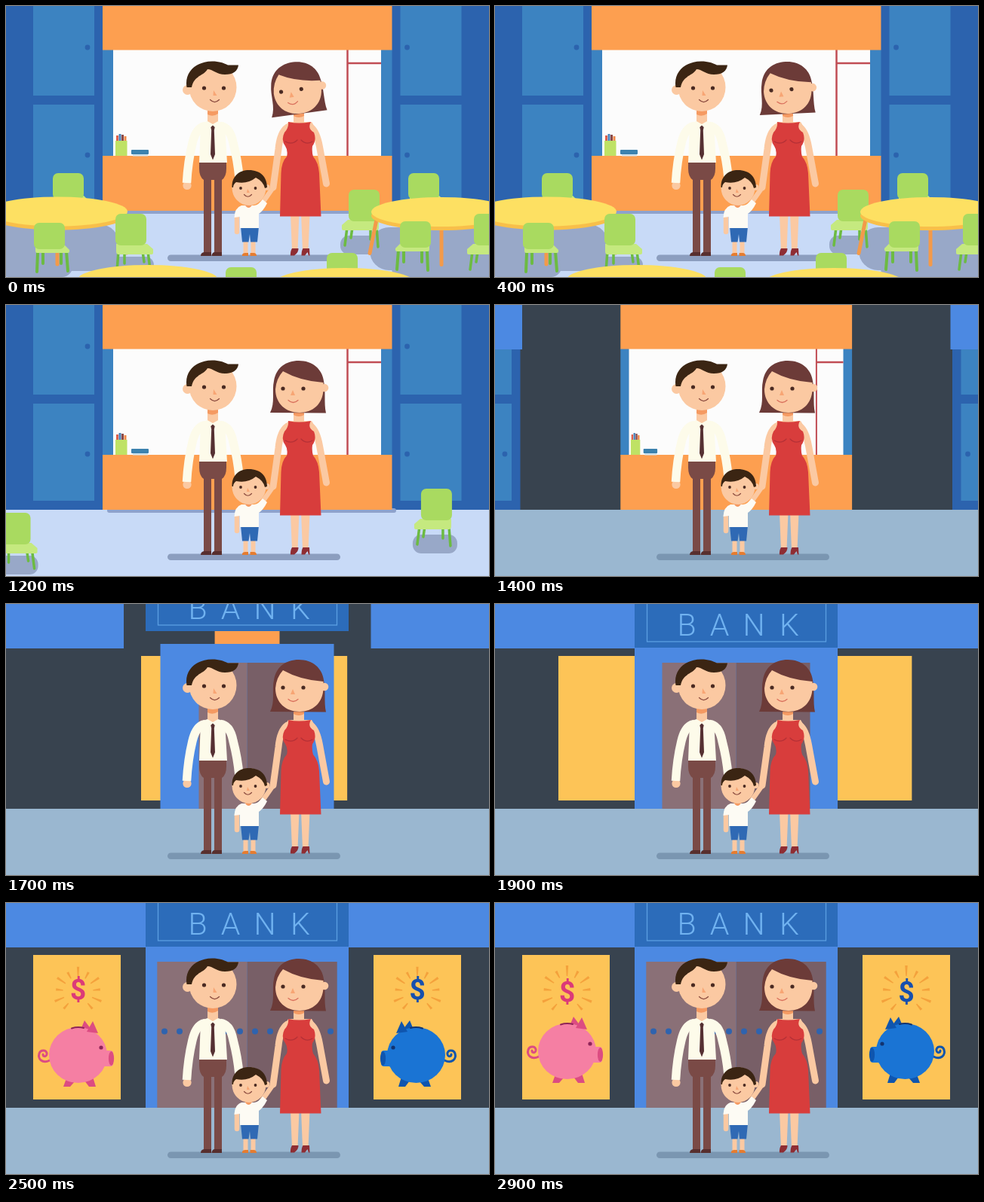
These frames come from a looping animation (640 by 360 pixels, 3000 ms). An HTML page:

```html
<!DOCTYPE html>
<html lang="en">
<head>
<meta charset="utf-8">
<title>Family, from classroom to bank</title>
<style>
html, body { margin: 0; width: 100%; height: 100%; overflow: hidden; background: #38434f; }
svg { display: block; width: 640px; height: 360px; }
text { font-family: Roboto, "Open Sans", sans-serif; text-anchor: middle; }
.line { fill: none; stroke-linecap: round; }
</style>
</head>
<body>
<svg viewBox="0 0 640 360" xmlns="http://www.w3.org/2000/svg">
<defs>
  <g id="chairBack">
    <path class="line" stroke="#6cbb42" stroke-width="4" d="M5 40L4 65M43 38L45 64M12 38V54M36 38V54"/>
    <path fill="#c5e97f" d="M2 30H41L47 36V38Q47 40 44 40H4Q2 40 2 37Z"/>
    <rect width="41" height="35" rx="7" fill="#a9da60"/>
  </g>
  <g id="chairSide">
    <path class="line" stroke="#6cbb42" stroke-width="3.5" d="M4 50L2 76M43 50L46 74M12 50V66M36 50L38 64"/>
    <path fill="#c5e97f" d="M1 40H42L50 47V52Q50 54 47 54H4Q1 54 1 50Z"/>
    <rect width="41" height="42" rx="7" fill="#a9da60"/>
  </g>
  <g id="table">
    <path class="line" stroke="#f39a4a" stroke-width="5" stroke-linecap="butt" d="M0 18V70M83 10L92 55M-86 10L-95 55"/>
    <ellipse cy="5" rx="93" ry="19.5" fill="#f8bf4a"/>
    <ellipse rx="93" ry="19.5" fill="#fde062"/>
  </g>
  <g id="cupboard">
    <rect x="-20" width="148.500" height="272" fill="#2c63ae"/>
    <path fill="#3c83c1" d="M36 0H117V119H36ZM36 131H117V260H36Z"/>
    <circle cx="108" cy="55" r="3.400" fill="#2c63ae"/>
    <circle cx="108" cy="198" r="3.400" fill="#2c63ae"/>
  </g>
  <g id="pig">
    <path class="line" stroke="var(--dark)" stroke-width="3" d="M58 204C48 209 42 202 44 195C46 189 55 190 54 196C53 200 49 199 49 196"/>
    <path fill="var(--dark)" d="M80 228L76 239H85L92 231ZM104 231L110 239H119L115 226ZM99 163L104 151L113 163Z"/>
    <ellipse cx="95.500" cy="197" rx="38.500" ry="37" fill="var(--skin)"/>
    <rect x="128" y="191" width="14" height="21" rx="4" fill="var(--skin)"/>
    <ellipse cx="139.500" cy="201.500" rx="3.600" ry="9.500" fill="var(--dark)"/>
    <path fill="var(--dark)" d="M107 166L115 152L122 168Z"/>
    <path class="line" stroke="var(--line)" stroke-width="2" d="M87 161.500Q95 159 103 161"/>
    <circle cx="126" cy="187" r="2.600" fill="var(--line)"/>
  </g>
  <clipPath id="clipL"><rect id="clipRectL" y="69" width="116" height="192"/></clipPath>
  <clipPath id="clipR"><rect id="clipRectR" y="69" width="116" height="192"/></clipPath>
</defs>

<rect width="640" height="360" fill="#38434f"/>
<rect id="floor" y="272" width="640" height="88"/>

<g id="cupL"><use href="#cupboard"/></g>
<g id="cupR"><use href="#cupboard" transform="translate(639.500) scale(-1 1)"/></g>
<rect id="counterShade" x="134" y="270" width="383" height="6" rx="3" fill="#8ea2cc"/>
<g id="room">
  <rect x="128" y="58" width="383.500" height="142" fill="#3c83c1"/>
  <rect x="142" y="58" width="355" height="142" fill="#fcfcfc"/>
  <path fill="none" stroke="#c04c54" stroke-width="2.500" d="M452.500 58V200M452.500 76H497"/>
  <path fill="#fd9f50" d="M128 0H511.500V58.500H128ZM128 199H511.500V272H128Z"/>
  <g fill="none" stroke-width="3">
    <path stroke="#e0604c" d="M147.500 172V181"/>
    <path stroke="#4b83b8" d="M151 170V181"/>
    <path stroke="#8b4a48" d="M154.500 171V181"/>
    <path stroke="#f08a4a" d="M158 173V181"/>
  </g>
  <rect x="145" y="179" width="15.500" height="20" fill="#bfe265"/>
  <rect x="166" y="191" width="23" height="6" rx="1" fill="#3c82ae"/>
  <rect x="168" y="197" width="20" height="2.500" fill="#cfe3ee"/>
</g>

<g id="posters"></g>

<rect id="wingL" y="0" width="186" height="59" fill="#4c89e2"/>
<rect id="wingR" y="0" width="187" height="59" fill="#4c89e2"/>
<rect id="frame" y="53" height="219" fill="#4c89e2"/>
<rect id="doorL" y="78" height="194" fill="#8a7077"/>
<rect id="doorR" y="78" height="194" fill="#785f67"/>
<g id="dots" fill="#2f63ae"></g>
<g id="sign">
  <rect x="185" y="-70" width="269" height="128" fill="#2c6cba"/>
  <rect x="201.500" y="-40" width="237" height="90" fill="none" stroke="#5b9fe2" stroke-width="1.300"/>
  <text x="254 297.500 343 390" y="42" font-size="41" font-weight="300" fill="#70b2f0">BANK</text>
</g>

<rect id="shade" x="214" y="330.500" width="229" height="8.500" rx="4.250"/>
<g id="furniture"></g>

<g id="man">
  <path fill="#fbc9a2" d="M267 135H281V158H267Z"/>
  <path fill="#f59a62" d="M267 138H281V143Q274 148 267 144Z"/>
  <circle cx="240" cy="238.500" r="5.600" fill="#fbc9a2"/>
  <path fill="#7a4a46" d="M256 206H292V216Q292 227 286 231V328H276V231H272V328H262V231Q256 227 256 216Z"/>
  <path fill="#582f2e" d="M258 332Q258 327 264 327H272V332ZM272.500 332Q273 327 277 327H286V332Z"/>
  <path fill="none" stroke="#fdfbea" stroke-width="11.500" d="M264 159.500Q252 161 247 182Q241 207 239.500 235M284 159.500Q297 161 301 182Q307 205 309 228"/>
  <path fill="#fdfbea" d="M267 153L274 157L281 153L290 156L293 208H256L258 156Z"/>
  <path fill="#553032" d="M271.300 161L274 158.500L276.700 161L275.800 165L277 197L274 204.500L271 197L272.200 165Z"/>
  <circle cx="240.500" cy="111.500" r="6.500" fill="#fbc9a2"/>
  <ellipse cx="274" cy="108" rx="31.500" ry="32" fill="#fbc9a2"/>
  <path fill="#3b2513" d="M239.500 108C236 88 252 73.500 273 73.500C283 73.500 289 76 294 78.500H308C307 86.500 301 91 290 91C279 91 274 84 267 84C262 93 249 92 246 108Z"/>
  <circle cx="262.500" cy="109" r="2.600" fill="#4a2a22"/>
  <circle cx="288.500" cy="109" r="2.600" fill="#4a2a22"/>
  <path fill="#f7a574" d="M275 112L279.500 119H274.500Z"/>
  <path class="line" stroke="#8a4a3e" stroke-width="1.200" d="M270.500 124.500Q276.500 130.500 282.500 124.500"/>
</g>

<g id="woman">
  <path class="line" stroke="#fbc9a2" stroke-width="9" d="M373 161Q363 168 361 190L354 241M404 161Q412 167 415.500 187L424.500 236"/>
  <path fill="#fbc9a2" d="M381 138H395V154H405L411 164L400 180H375L368 164L374 154H381ZM377 276H388.500L386.500 325H379ZM391 276H402.500L400.500 325H393Z"/>
  <path fill="#8e2d33" d="M379 322L387.500 322Q388 327 382 331.500H377Q376.500 326 379 322ZM393.500 322H402L402.500 331.500H401L399.500 327L396 331.500H391.500Q391.500 325 393.500 322Z"/>
  <path fill="#d83d3c" d="M374 154Q388 157 404 154Q399 163 408 168Q412 178 406 186Q405 194 407 200Q414 208 415 222L417.500 279.500H363L364.500 222Q365 207 372 200Q374 192 370 186Q364 178 369 168Q375 162 374 154Z"/>
  <path class="line" stroke="#b53036" stroke-width="1.300" d="M370 180Q379 185 386 178M391 178Q398 185 406 180"/>
  <path fill="#f59a62" d="M381 141H395V146Q388 150 381 146Z"/>
  <g id="head">
    <path fill="#6c3b38" d="M350 143C357 130 352 114 355 101C358 83 371 74 388 74C406 74 419 85 421 101C424 114 421 130 424 143.500Z"/>
    <circle cx="422" cy="110" r="5.300" fill="#fbc9a2"/>
    <path fill="#fbc9a2" d="M357 112Q358 98 367 88Q390 101 420.500 103V112C420 132 406 143 389 143C371 143 357 131 357 112Z"/>
    <circle cx="367" cy="111" r="2.600" fill="#4a2a22"/>
    <circle cx="394" cy="111" r="2.600" fill="#4a2a22"/>
    <path fill="#f7a574" d="M380 113L383 120H377Z"/>
    <path class="line" stroke="#d9705c" stroke-width="1.200" d="M374 126.500Q380.500 132.500 387 126.500"/>
  </g>
</g>

<g id="kid">
  <g class="line" stroke="#fbc9a2">
    <path stroke-width="6.500" d="M306 279L306 300M338 264L352 244"/>
    <path stroke-width="6" stroke-linecap="butt" d="M317.500 310V329M327.500 310V329"/>
  </g>
  <path fill="#e57c30" d="M313 332V330Q314 328 317 328H321V332ZM323.500 332V328H328Q332 328 332 332Z"/>
  <path fill="#2f69b4" d="M311 293H335L333 313.500H324L323 303L321.500 313.500H313Z"/>
  <path fill="#fdfbf4" d="M312 265H329Q335 264 340 257L346 262Q341 272 335 276V295H310V280L302.500 281Q303 268 312 265Z"/>
  <path fill="#f59a62" d="M316 262H327Q325 268 321 268Q317 267 316 262Z"/>
  <circle cx="345.500" cy="241" r="4" fill="#fbc9a2"/>
  <ellipse cx="322" cy="241.500" rx="22.500" ry="23.500" fill="#fbc9a2"/>
  <path fill="#3b2513" d="M299.500 241C299 226 309 218 322 218C337 218 346 227 346 241L343 242Q341 233 331 228Q320 237 305 234Q301 237 301 241Z"/>
  <circle cx="311" cy="242" r="1.900" fill="#4a2a22"/>
  <circle cx="330.500" cy="242" r="1.900" fill="#4a2a22"/>
  <path fill="#f7a574" d="M320 243L323 248H319Z"/>
  <path class="line" stroke="#8a4a3e" stroke-width="1.200" d="M315.500 250.500Q320.500 256 325.500 250.500"/>
</g>
</svg>

<script>
const $ = id => document.getElementById(id);
const set = (id, attrs) => {
  for (const k in attrs) $(id).setAttribute(k, attrs[k]);
};
const each = (sel, name, value) =>
  document.querySelectorAll(sel).forEach(el => el.setAttribute(name, value));
const LOOP = 3000, STEP = 100, MID = 319.5;

// Piecewise track: values at even time steps from `start`, held outside.
const track = (start, ...v) => t => {
  const p = Math.max(0, Math.min(v.length - 1, (t - start) / STEP));
  const i = Math.floor(p);
  return i + 1 < v.length ? v[i] + (v[i + 1] - v[i]) * (p - i) : v[i];
};

// Floor shadows: direction, start of the slide out, x, y, width, height.
const shadows = [
  [-1, 660, -30, 290, 181, 62],
  [1, 800, 482, 294, 181, 57],
  [-1, 560, -10, 330, 98, 30],
  [1, 820, 511, 332, 150, 30],
  [-1, 923, 138, 333, 58, 25],
  [1, 981, 443, 305, 59, 25]
];
// Furniture: direction, start, kind, x, y, mirrored.
const pieces = [
  [-1, 579, 'chairBack', 62, 222],
  [1, 716, 'chairBack', 533, 222],
  [1, 981, 'chairSide', 495, 244, true],
  [-1, 660, 'table', 68, 273],
  [1, 800, 'table', 577, 273.5],
  [-1, 560, 'chairBack', 37, 288],
  [-1, 923, 'chairSide', 145, 276],
  [1, 820, 'chairBack', 563, 286, true],
  [1, 780, 'chairSide', 661, 276, true],
  [1, 800, 'chairBack', 425, 328],
  [-1, 765, 'table', 188, 363.5],
  [1, 755, 'table', 449, 367.5],
  [-1, 780, 'chairBack', 291, 347]
];
$('furniture').innerHTML =
  shadows.map(([, , x, y, w, h]) =>
    `<rect x="${x}" y="${y}" width="${w}" height="${h}" rx="${h * .45}" fill="#98a8c8"/>`).join('') +
  pieces.map(([, , kind, x, y, flip]) =>
    `<g><use href="#${kind}" transform="translate(${x} ${y}) scale(${flip ? -1 : 1} 1)"/></g>`).join('');
const slides = [...shadows, ...pieces];
const movers = [...$('furniture').children];

const rays = Array.from({ length: 11 }, (_, i) => {
  const len = i % 2 ? 35 : 31;
  return `<path fill="#f4a13c" transform="rotate(${i * 28 - 230})" d="M21 -.7L${len} -1.7V1.7L21 .7Z"/>`;
}).join('');

const poster = (side, cx, flip, skin, dark, line, coin) => `
  <g clip-path="url(#clip${side})">
    <rect x="0" y="60" width="640" height="210" fill="#fdc457"/>
    <g transform="translate(${cx} 118)"><g class="rays">${rays}</g></g>
    <g class="coin"><text x="${cx}" y="131" font-size="37" font-weight="700" fill="${coin}">$</text></g>
    <g class="pig" style="--skin:${skin};--dark:${dark};--line:${line}">
      <use href="#pig"${flip ? ' transform="translate(639) scale(-1 1)"' : ''}/>
    </g>
  </g>`;
$('posters').innerHTML =
  poster('L', 95.5, false, '#f57fa3', '#dc4c82', '#8f2458', '#dc3a78') +
  poster('R', 545, true, '#1a74d4', '#0f55ae', '#12336f', '#164fae');

$('dots').innerHTML = Array.from({ length: 12 }, (_, i) =>
  `<circle cx="${210 + i * 20}" cy="170.500"/>`).join('');

const tilt = track(100, -8, -7.4, -5.6, -3.2, -1.2, 0);
const cupboards = track(1200, 0, 40, 95, 150);
const room = track(1200, 1, .95, .8, .58, .37, .224, .1, 0);
const wings = track(1300, 190, 150, 100, 58, 30, 10, 0);
const sign = track(1400, -64, -56, -40, -22, -7, 0);
const frame = track(1400, 0, 30, 75, 115, 130, 134.5);
const doors = track(1500, 0, 30, 64, 84, 98, 107, 112, 115.5, 117.5, 118.5, 119.2);
const windows = track(1600, 170, 143, 90, 48, 24, 10.5, 4, 0);
const pigs = track(1900, 110, 85, 55, 32, 17, 9, 5, 2.5, 1, 0);
const coins = track(1900, -75, -58, -37, -23, -13, -7, -3.5, -1.5, -.5, 0);
const burst = track(2200, 0, .4, .8, .95, 1);
const dotSize = track(2100, 0, 1.3, 2.8, 3.7, 4);

function draw(t) {
  const school = t < 1300;
  set('floor', { fill: school ? '#c8daf7' : '#9ab7d0' });
  set('shade', { fill: school ? '#8c9ebf' : '#7a96b1' });
  set('counterShade', { visibility: school ? 'visible' : 'hidden' });
  set('head', { transform: `rotate(${tilt(t)} 388 130)` });

  slides.forEach(([dir, start], i) => {
    const s = Math.max(0, t - start) / 1000;
    movers[i].setAttribute('transform', `translate(${dir * 2000 * s * s} 0)`);
  });

  const c = cupboards(t);
  set('cupL', { transform: `translate(${-c} 0)` });
  set('cupR', { transform: `translate(${c} 0)` });
  const k = room(t);
  set('room', { transform: `translate(${MID * (1 - k)} 0) scale(${k} 1)` });

  const w = wings(t), f = frame(t), d = doors(t), win = windows(t);
  set('wingL', { x: -w });
  set('wingR', { x: 453.5 + w });
  set('sign', { transform: `translate(0 ${sign(t)})` });
  set('frame', { x: MID - f, width: 2 * f });
  set('doorL', { x: MID - d, width: d });
  set('doorR', { x: MID, width: d });
  each('#dots circle', 'r', dotSize(t));

  set('posters', { visibility: t < 1600 ? 'hidden' : 'visible' });
  set('clipRectL', { x: 36 + win });
  set('clipRectR', { x: 487 - win * 1.055 });
  each('.pig', 'transform', `translate(0 ${pigs(t)})`);
  each('.coin', 'transform', `translate(0 ${coins(t)})`);
  each('.rays', 'transform', `scale(${burst(t)})`);
}

const begin = performance.now();
function tick() {
  const t = (performance.now() - begin) % LOOP;
  draw(t < 200 ? 0 : Math.floor(t / STEP) * STEP);
  requestAnimationFrame(tick);
}
tick();
</script>
</body>
</html>
```
